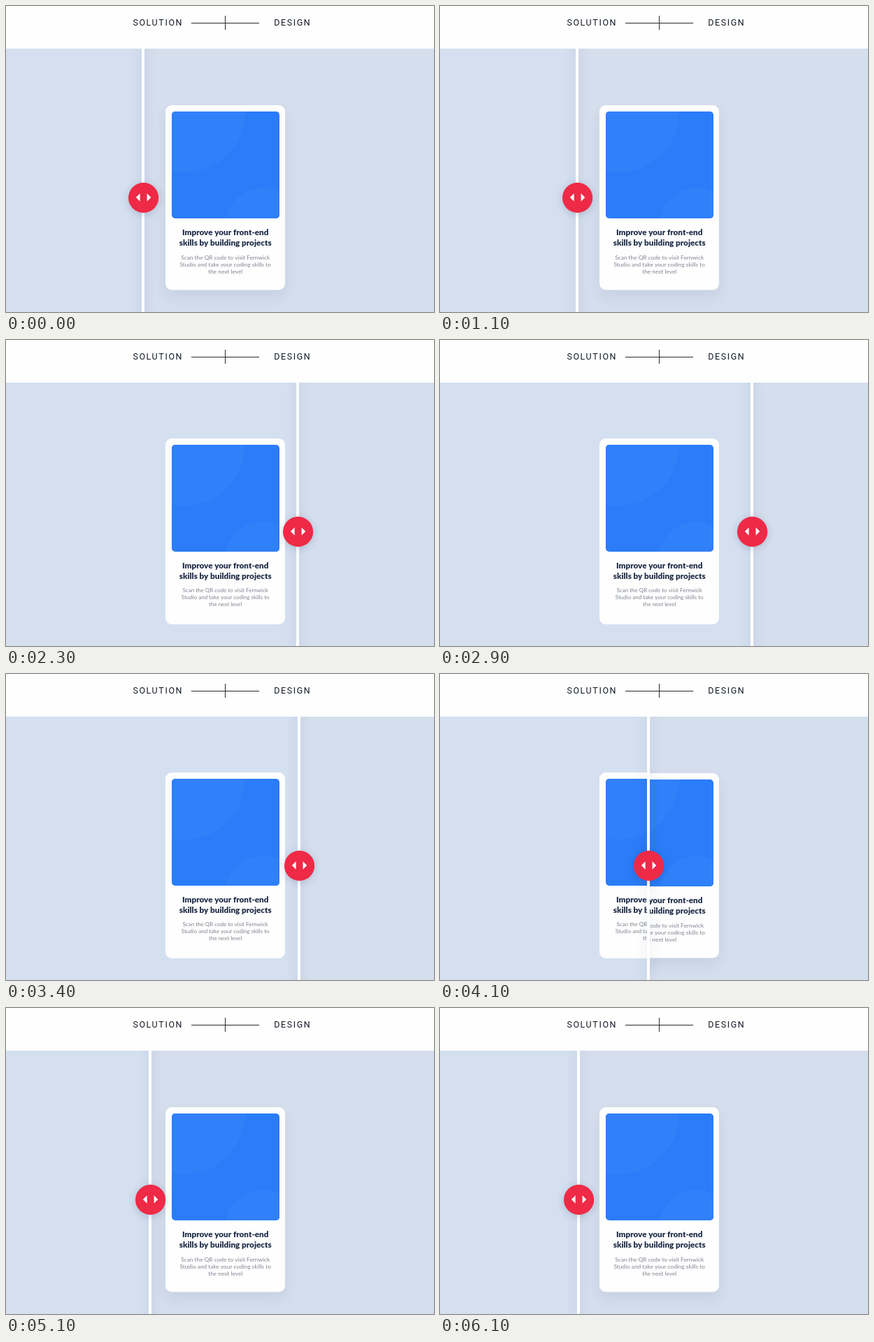
Animation of 612 by 438 pixels, one loop 7 s. Source, as an HTML page with a canvas:

```html
<!DOCTYPE html>
<html lang="en">
<head>
<meta charset="utf-8">
<title>Solution and design comparison</title>
<style>
  html, body { margin: 0; width: 100%; height: 100%; overflow: hidden; background: #fefefe; }
  canvas { display: block; width: 612px; height: 438px; }
</style>
</head>
<body>
<canvas id="stage"></canvas>
<script>
const W = 612, H = 438, TOP = 61, LOOP = 7000, STEP = 100;
const canvas = document.getElementById('stage');
const ctx = canvas.getContext('2d');
const dpr = window.devicePixelRatio || 1;
canvas.width = W * dpr;
canvas.height = H * dpr;
ctx.scale(dpr, dpr);

// Divider position: [time, x]
const path = [
  [0, 196.5], [600, 196.5], [800, 192], [1100, 196.5], [1200, 196.5],
  [1400, 210], [1700, 268], [2000, 345], [2300, 417], [2800, 438],
  [3000, 454], [3100, 454], [3400, 419], [3900, 325.5], [4100, 298],
  [4700, 213.5], [5100, 206.5], [5300, 195.5], [5500, 199], [6100, 198.5]
];

const design = { bg: '#d5deed', top: 142, height: 264.5, body: 8.3, bodyY: 363, shadow: 0.08 };
const solution = { bg: '#d4e0f0', top: 141, height: 266, body: 8, bodyY: 361, shadow: 0 };

const titleLines = ['Improve your front-end', 'skills by building projects'];
const bodyLines = [
  'Scan the QR code to visit Fernwick',
  'Studio and take your coding skills to',
  'the next level'
];

function dividerAt(t) {
  for (let i = 1; i < path.length; i++) {
    const [t0, x0] = path[i - 1], [t1, x1] = path[i];
    if (t <= t1) return x0 + (x1 - x0) * (t - t0) / (t1 - t0);
  }
  return path[path.length - 1][1];
}

function rect(x, y, w, h, color) {
  ctx.fillStyle = color;
  ctx.fillRect(x, y, w, h);
}

function disc(x, y, r, color) {
  ctx.fillStyle = color;
  ctx.beginPath();
  ctx.arc(x, y, r, 0, Math.PI * 2);
  ctx.fill();
}

function rounded(x, y, w, h, r) {
  ctx.beginPath();
  ctx.roundRect(x, y, w, h, r);
}

function setShadow(alpha, blur, dy) {
  ctx.shadowColor = `rgba(30, 50, 90, ${alpha})`;
  ctx.shadowBlur = blur * dpr;
  ctx.shadowOffsetY = dy * dpr;
}

function lines(list, y, pitch, font, color) {
  ctx.font = font;
  ctx.fillStyle = color;
  ctx.textAlign = 'center';
  list.forEach((s, i) => ctx.fillText(s, 313.7, y + i * pitch));
}

function header() {
  rect(0, 0, W, TOP, '#fefefe');
  ctx.font = '12.5px Roboto, sans-serif';
  ctx.letterSpacing = '1.6px';
  ctx.textAlign = 'left';
  ctx.fillStyle = '#141b26';
  ctx.fillText('SOLUTION', 181.4, 28);
  ctx.fillText('DESIGN', 383.2, 28);
  ctx.letterSpacing = '0px';
  rect(265, 24, 97, 1, '#2a2a2a');
  rect(313, 14, 1, 20, '#2a2a2a');
}

function panel(p, x, w) {
  ctx.save();
  ctx.beginPath();
  ctx.rect(x, TOP, w, H - TOP);
  ctx.clip();
  rect(x, TOP, w, H - TOP, p.bg);

  ctx.save();
  setShadow(p.shadow, 20, 10);
  ctx.fillStyle = '#fefefe';
  rounded(228, p.top, 171, p.height, 9);
  ctx.fill();
  ctx.restore();

  ctx.save();
  rounded(237, p.top + 9, 154, 153, 5);
  ctx.clip();
  rect(236, p.top + 8, 156, 155, '#2a7cf8');
  disc(255, p.top + 9, 87, '#3080fa');
  disc(367, p.top + 173, 54, '#3080fa');
  ctx.restore();

  lines(titleLines, p.top + 186.3, 15, '900 11.7px Lato, sans-serif', '#1f2c48');
  lines(bodyLines, p.bodyY, 10.1, `${p.body}px Lato, sans-serif`, '#7e848f');
  ctx.restore();
}

function arrow(x, dir) {
  ctx.fillStyle = '#fff';
  ctx.beginPath();
  ctx.moveTo(x + dir * 10.7, 274);
  ctx.lineTo(x + dir * 5, 268.3);
  ctx.lineTo(x + dir * 5, 279.7);
  ctx.fill();
}

// x is the middle of the 4px bar
function divider(x) {
  const mid = x + 0.6;
  ctx.save();
  ctx.beginPath();
  ctx.rect(0, TOP, W, H - TOP);
  ctx.clip();
  setShadow(0.16, 16, 0);
  rect(x - 2, TOP - 20, 4, H, '#fff');
  setShadow(0.2, 12, 2);
  disc(mid, 274.4, 21.6, '#ee2a46');
  ctx.restore();
  arrow(mid, -1);
  arrow(mid, 1);
}

function draw(now) {
  const t = Math.floor((now % LOOP) / STEP) * STEP;
  const x = Math.floor(dividerAt(t));
  header();
  panel(solution, 0, x);
  panel(design, x, W - x);
  divider(x);
}

const start = performance.now();
function tick() {
  draw(performance.now() - start);
  requestAnimationFrame(tick);
}
tick();
</script>
</body>
</html>
```
